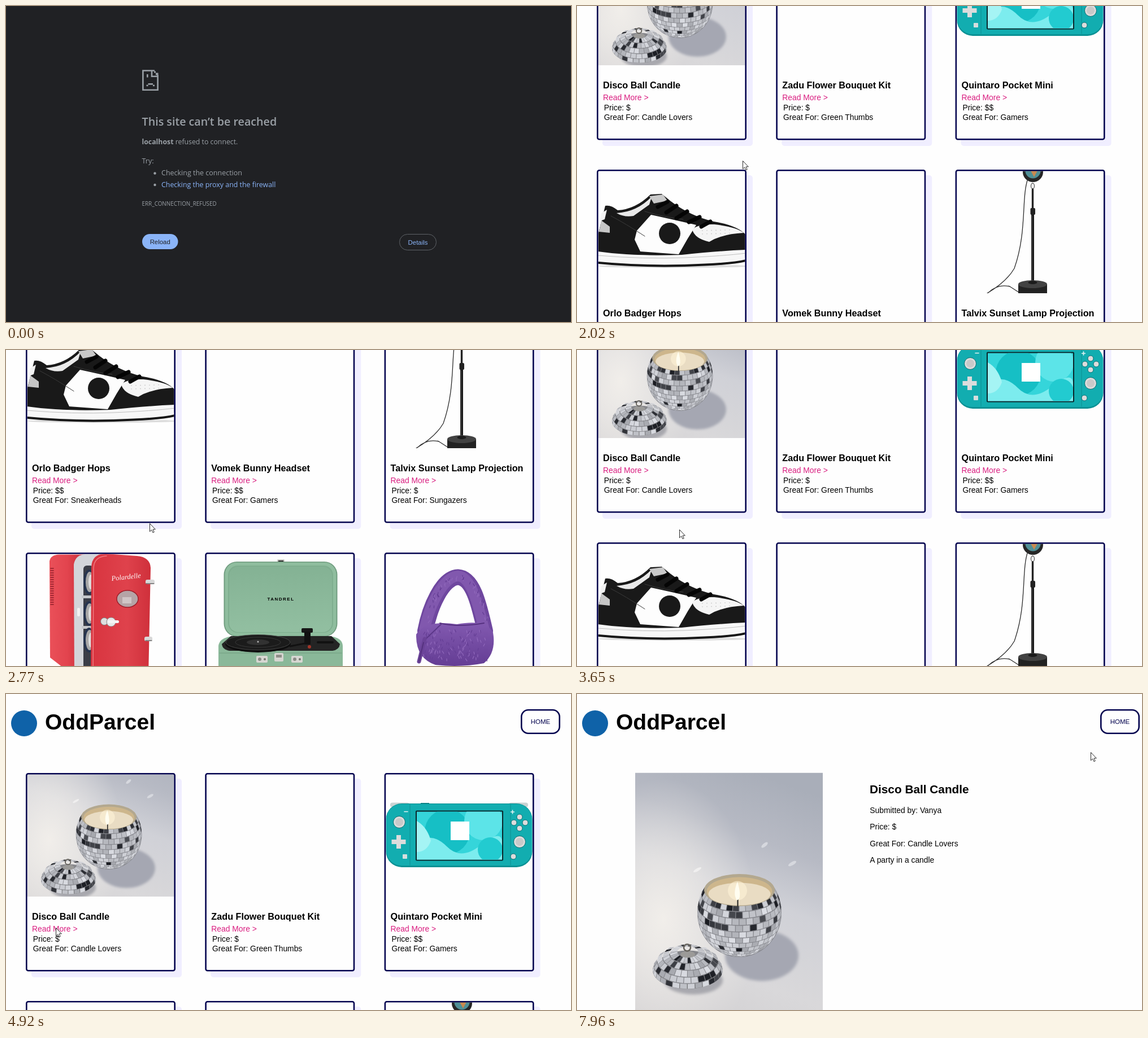
Animation, 1000 px wide and 560 px high, one loop 8000 ms. Source, as an HTML page:

```html
<!DOCTYPE html>
<html lang="en">
<head>
<meta charset="utf-8">
<title>Gift shop demo</title>
<style>
  html, body { margin: 0; width: 100%; height: 100%; overflow: hidden; background: #fefefe; }
  #stage { display: block; width: 100vw; height: 100vh; font: 13.87px "Liberation Sans", Arial, sans-serif; }
  #error { font-family: "Open Sans", "Noto Sans", sans-serif; font-size: 12.5px; fill: #9aa0a6; }
  #error .btn { font: 11.4px "Liberation Sans", Arial, sans-serif; }
  .name { font-size: 16.23px; font-weight: bold; }
  .more { fill: #d91c7f; }
  .edge { fill: none; stroke: #04044f; stroke-width: 2.6; }
</style>
</head>
<body>
<svg id="stage" viewBox="0 0 1000 560"></svg>
<script>
const LOOP = 8000;
const text = (x, y, s, attrs = '') => `<text x="${x}" y="${y}" ${attrs}>${s}</text>`;
const rect = (x, y, w, h, fill, rx = 0) =>
  `<rect x="${x}" y="${y}" width="${w}" height="${h}" rx="${rx}" fill="${fill}"/>`;
const oval = (x, y, rx, ry, fill, attrs = '') =>
  `<ellipse cx="${x}" cy="${y}" rx="${rx}" ry="${ry}" fill="${fill}" ${attrs}/>`;
const dot = (x, y, r, fill, attrs) => oval(x, y, r, r, fill, attrs);
const shape = (d, fill) => `<path d="${d}" fill="${fill}"/>`;
const line = (d, color, width = 1) =>
  `<path d="${d}" fill="none" stroke="${color}" stroke-width="${width}" stroke-linecap="round"/>`;
const fade = (id, dir, stops) => `<linearGradient id="${id}" ${dir}>` +
  stops.map(([at, c]) => `<stop offset="${at}" stop-color="${c}"/>`).join('') + '</linearGradient>';

let seed = 11;
const rand = () => (seed = seed * 16807 % 2147483647) / 2147483647;

// Mirror tiles on a tilted dome: latitude from..to, in radians.
function mirrors({ cx, cy, r, h, tilt, from, to, rows, cols, dark }) {
  const at = (lat, lon) => [
    cx + r * Math.cos(lat) * Math.sin(lon),
    cy - h * Math.sin(lat) * Math.cos(tilt) + r * Math.cos(lat) * Math.cos(lon) * Math.sin(tilt)
  ].map(v => v.toFixed(1)).join();
  let out = '';
  const dLat = (to - from) / rows, dLon = 2 * Math.PI / cols;
  for (let i = 0; i < rows; i++) for (let j = 0; j < cols; j++) {
    const a = from + i * dLat, lon = (j + i % 2 / 2) * dLon - Math.PI, mid = a + dLat / 2;
    const facing = Math.cos(mid) * Math.cos(lon + dLon / 2) * Math.cos(tilt) + Math.sin(mid) * Math.sin(tilt);
    if (facing < 0.03) continue;
    const black = rand() < dark(i / rows);
    const v = Math.round(black ? 25 + rand() * 50 : 165 + rand() * 55);
    const b = a + dLat * 0.88, end = lon + dLon * 0.9;
    out += `<polygon points="${at(a, lon)} ${at(a, end)} ${at(b, end)} ${at(b, lon)}" fill="rgb(${v},${v + 2},${v + 8})"/>`;
  }
  return out;
}

const photo = rect(0, 0, 332, 501, 'url(#wall)') + rect(0, 0, 332, 501, 'url(#glow)') +
  oval(229, 128, 7, 3, '#d6d8de', 'transform="rotate(-40 229 128)"') +
  oval(278, 161, 8, 3, '#d6d8de', 'transform="rotate(-30 278 161)"') +
  oval(110, 172, 8, 2.5, '#f0efef', 'transform="rotate(-30 110 172)"') +
  oval(224, 324, 65, 45, '#a5a7b2', 'filter="url(#soft)"') + oval(103, 368, 52, 25, '#a8a8ae', 'filter="url(#soft)"') +
  shape('M122.500 204A74.500 79 0 1 0 246.500 204Z', '#85868c') +
  mirrors({ cx: 184.5, cy: 247, r: 74.5, h: 80, tilt: 0.46, from: 0.59, to: -1.3, rows: 12, cols: 36,
    dark: p => p < 0.3 ? 0.42 : 0.04 }) +
  oval(184.5, 208, 62.5, 28.5, '#b3a88f') + oval(184.5, 210, 58, 25, '#cdb68c') +
  oval(184.5, 215, 55, 20, '#e9dcc3') + dot(181, 209, 17, '#fff3d8', 'opacity=".6"') +
  line('M181.500 224V236', '#222', 2) + shape('M181 193Q172 215 180 226Q190 224 181 193', '#fffdf0') +
  oval(93, 350, 62, 33, '#77777a') + oval(93, 345, 55, 30, '#85868b') +
  mirrors({ cx: 93, cy: 350, r: 62, h: 40, tilt: 0.56, from: 0, to: 1.3, rows: 5, cols: 28, dark: () => 0.26 }) +
  oval(93, 322, 13, 6, '#9b9a98') + `<circle cx="92" cy="310" r="6" fill="none" stroke="#66635d" stroke-width="2.500"/>`;

const knob = (x, y, r) => dot(x, y, r, '#dcdcdc', 'stroke="#0a6f72" stroke-width="1"');
const console3 = rect(680, 192.5, 34, 8, '#c9d3d3', 4) + rect(890, 192.5, 34, 8, '#c9d3d3', 4) +
  rect(672.5, 194, 259, 113, '#0b9194', 28) + rect(673, 195, 258, 109, '#12adb0', 27) +
  rect(734, 193, 15, 2, '#0b8285') +
  line('M715 196V303M893 196V303', '#0c8e92') +
  rect(725, 206.5, 155, 89, '#0a2328', 2) + rect(727, 208.5, 151, 85, '#35d5da') +
  `<svg x="727" y="208.500" width="151" height="85" viewBox="727 208.500 151 85">` +
  dot(781, 244, 40, '#16bfc5') + dot(845, 225, 34, '#5ce4e8') +
  shape('M727 262Q755 244 780 270T840 268T878 260V294H727Z', '#7cecee') +
  shape('M727 225Q745 235 752 260Q745 280 727 280Z', '#a5f4f4') + dot(857, 276, 22, '#22cbd0') + '</svg>' +
  rect(787, 226, 33, 33, '#fff') +
  knob(696, 227, 10.5) + dot(696, 227, 7, '#c9c9c9') + knob(909, 262, 10.5) + dot(909, 262, 7, '#c9c9c9') +
  shape('M691 250h8v8h8.500v8h-8.500v8h-8v-8h-8.500v-8h8.500z', '#dcdcdc') +
  [[909, 218], [899, 228], [919, 228], [909, 238]].map(([x, y]) => knob(x, y, 5)).join('') +
  rect(702, 284, 8, 8, '#d4dede', 1) + knob(898, 288, 5) +
  line('M705 208.500H711M893.500 209H899.500M896.500 206V212', '#e6f4f4', 1.6);

const shoe = oval(170, 461, 134, 3, '#ddd') +
  shape('M38 402L50 354Q60 352 72 362Q104 360 130 334L150 333L166 346Q200 372 242 382Q285 389 299 406V445L38 440Z', '#191919') +
  shape('M70 367Q106 365 132 338L128 352L100 372Q84 375 70 367', '#e9e9e9') +
  shape('M128 337L152 334L160 345L136 350Z', '#c9c9c9') +
  shape('M43 380L58 391V402L39 400Z', '#c6c6c6') + shape('M43 367L53 361L49 378L41 381Z', '#f2f2f2') +
  shape('M106 398L131 370Q168 378 211 388L196 412L180 440L112 435L102 414Z', '#fdfdfd') +
  shape('M204 396Q214 386 243 387Q281 391 295 402Q257 404 234 418Q208 412 204 396', '#f5f5f5') +
  dot(164, 403, 19, '#191919') +
  line('M60 372Q85 385 120 408M120 364Q160 376 188 378', '#3a3a3a') +
  line('M143 356L160 347M158 366L176 354M176 376L195 364M198 383L217 374M220 391L236 382', '#050505', 7) +
  Array.from({ length: 14 }, (_, i) => dot(222 + i % 7 * 8, 398 + (i > 6) * 6 - i % 7 * .2, .8, '#bbb')).join('') +
  shape('M37 435Q100 444 185 441Q250 434 299 432V449Q210 462 150 460L40 455Z', '#f7f7f7') +
  line('M37 442Q120 449 190 446T299 438', '#bdbdbd') + line('M38 455Q110 462 190 460T299 451', '#161616', 4);

const lamp = dot(807, 294, 18, '#262626') + dot(807, 292, 13.5, '#4f8f96') + shape('M803 292L815 292L809 303Z', '#c98a50') +
  line('M798 306C786 340 797 400 774 465Q760 489 726 509M728 508Q744 492 766 497L783 508', '#2b2b2b', 1.3) +
  oval(806.5, 319, 3, 5, 'none', 'stroke="#555" stroke-width="1.300"') + line('M806.500 325V362', '#222', 3.4) +
  line('M806.500 368V488', '#1d1d1d', 5) + rect(802.5, 358, 8.5, 12, '#222', 2) + line('M805.500 372V486', '#555', .8) +
  rect(781, 493, 51, 18, '#222') + oval(806.5, 493, 25.5, 7, '#424242') + oval(806.5, 490, 8, 3, '#1b1b1b');

const can = y => oval(147, y, 10, 22, '#26344f') + oval(148, y, 7, 18, '#a8a8a8') + oval(150, y, 4, 13, '#ddd');
const fridge = shape('M77 374Q79 363 94 362.500H140L122 579L78 545Z', 'url(#side)') +
  Array.from({ length: 17 }, (_, i) => line(`M79 ${387 + i * 4}H84`, '#8e1d28', 1.6)).join('') +
  shape('M120 380Q123 362 142 362H170V579H121Z', '#d3d5da') + rect(137, 382, 18, 197, '#3a3d47', 6) +
  can(411) + rect(134, 435, 20, 5, '#c5c7cb') + can(467) + rect(134, 489, 20, 5, '#c5c7cb') + can(514) +
  rect(126, 457, 5, 15, '#f2f2f2', 2) +
  shape('M151 385Q152 361 176 361L232 365Q255 367 256 386L252 579H150Z', 'url(#door)') +
  line('M154 579L155 386Q156 366 178 365', '#f07a80', 1.5) +
  oval(215, 441, 19, 15, '#b5a4a6', 'stroke="#9d1f2b" stroke-width="1.500"') + rect(206, 438, 16, 11, '#d0c5c6') +
  text(187, 409, 'Polardelle', 'font-family="Liberation Serif, serif" font-style="italic" font-size="12.500" fill="#fff" transform="rotate(-6 187 409)"') +
  rect(247, 407, 16, 8, '#d8d8d8', 3) + rect(245, 508, 14, 8, '#d8d8d8', 3) + line('M248 414H262M247 515H258', '#333', 1.2) +
  dot(174, 481, 6.5, '#dedede', 'stroke="#777"') + dot(186, 482, 8, '#e8e8e8', 'stroke="#8a8a8a"') + rect(180, 479, 20, 5, '#f4f4f4', 2.5);

const latch = x => rect(x - 10, 542, 20, 12, '#d7d7d2', 2) + dot(x - 4, 548, 3, '#8b8b86') + dot(x + 5, 548, 2, '#77776f');
const player = rect(480, 371, 13, 10, '#c5c5c0', 2) + rect(482, 373, 9, 3, '#333') +
  rect(385.5, 375, 201, 133, '#719d80', 23) + rect(387.5, 376.5, 197, 130, '#8fbd9e', 21) +
  rect(393, 382, 186, 119, '#7fae8f', 17) + rect(395, 384, 182, 116, 'url(#felt)', 16) +
  text(486.5, 443.5, 'TANDREL', 'text-anchor="middle" font-size="8" font-weight="bold" letter-spacing="1.500"') +
  shape('M376 524Q378 511 396 508H578Q595 511 596 524V579H376Z', '#8ab899') +
  shape('M382 521L398 507H576L591 521Q590 531 578 533H396Q383 531 382 521', '#242424') +
  oval(446, 521, 58, 15, '#0e0e0e') + oval(446, 518, 57, 13.5, '#1b1b1b', 'stroke="#555" stroke-width=".700"') +
  oval(446, 518, 40, 9, 'none', 'stroke="#383838"') + oval(446, 518, 20, 5, '#323232') + dot(446, 517, 1.5, '#bbb') +
  rect(523, 493, 20, 8, '#161616', 2) + rect(528, 499, 11, 23, '#111', 2) + line('M534 519L503 525', '#111', 3) + dot(537, 526, 3, '#a33528') +
  rect(550, 516, 30, 4, '#111', 2) +
  line('M378 537H594', '#719d80') + latch(453) + latch(515) + rect(475, 537, 16, 15, '#d5d5d0', 2) + rect(478, 540, 10, 5, '#8e8e88');

const tuft = (x, y) => line(`M${x.toFixed(1)} ${y.toFixed(1)}l${(rand() * 6 - 3).toFixed(1)} 4`, rand() < .5 ? '#9068bb' : '#643d94', 1.2);
const bag = line('M742 498C750 456 772 404 800 402.500C828 404 838 456 848 498', '#6f479f', 28) +
  line('M741 494C750 452 774 402 800 400.500C824 402 836 452 846 494', '#8158ae', 19) +
  shape('M726 504Q742 478 798 486Q850 476 862 501Q868 536 846 555Q805 563 760 558Q725 546 726 504', 'url(#fur)') +
  line('M768 484Q800 492 846 484', '#563180', 2) +
  Array.from({ length: 110 }, () => tuft(738 + rand() * 114, 494 + rand() * 54)).join('') +
  Array.from({ length: 60 }, () => {
    const a = Math.PI * (0.05 + rand() * 0.9);
    return tuft(796 - Math.cos(a) * 50 + rand() * 8, 486 - Math.sin(a) * 88 + rand() * 8);
  }).join('') +
  line('M770 486L741 514', '#5b3788', 2) + line('M741 512L731 552', '#6a4297', 7) + line('M739 518L731 552', '#4b2a74', 1.2);

// [name, price, audience, picture, vertical shift of its drawing]
const items = [
  ['Disco Ball Candle', '$', 'Candle Lovers', '', 0],
  ['Zadu Flower Bouquet Kit', '$', 'Green Thumbs', '', 0],
  ['Quintaro Pocket Mini', '$$', 'Gamers', console3, 0],
  ['Orlo Badger Hops', '$$', 'Sneakerheads', shoe, 254],
  ['Vomek Bunny Headset', '$$', 'Gamers', '', 254],
  ['Talvix Sunset Lamp Projection', '$', 'Sungazers', lamp, 254],
  ['', '', '', fridge, 589], ['', '', '', player, 589], ['', '', '', bag, 589]
];
const card = ([name, price, fans, art, shift], i) => {
  const x = 35 + i % 3 * 317.3, y = 140 + Math.floor(i / 3) * 404;
  const box = `x="${x + 2.6}" y="${y + 2.6}" width="260" height="216.500"`;
  return rect(x + 10, y + 10, 266, 352, '#f0eeff', 5) + rect(x, y, 265, 351, '#fefefe', 4) +
    (i ? `<svg ${box} viewBox="${x + 2.6} ${y + 2.6 - shift} 260 216.500">${art}</svg>`
       : `<svg ${box} viewBox="0 112 332 276.500"><use href="#photo"/></svg>`) +
    `<rect class="edge" x="${x + 1.3}" y="${y + 1.3}" width="262.400" height="349" rx="3"/>` +
    (name && text(x + 11, y + 259.5, name, 'class="name"') +
      text(x + 11, y + 281, 'Read More &gt;', 'class="more"') +
      text(x + 12.8, y + 298.5, 'Price: ' + price) + text(x + 12.8, y + 316, 'Great For: ' + fans));
};

const errorPage = rect(0, 0, 1000, 560, '#202124') +
  line('M262 114.500H242.400V148.700H268.600V123', '#9aa0a6', 2.6) + line('M258 115V124.700H268', '#9aa0a6', 2.6) +
  rect(262, 115.5, 3, 3, '#9aa0a6') + rect(265, 118.5, 4.5, 4, '#9aa0a6') + rect(249, 121, 2.6, 5.5, '#9aa0a6') +
  rect(251.5, 137, 8.5, 2.6, '#9aa0a6') + rect(248.5, 139.6, 3, 2.6, '#9aa0a6') + rect(260, 139.6, 3, 2.6, '#9aa0a6') +
  text(240.5, 211.5, 'This site can’t be reached', 'font-size="19.700" font-weight="600"') +
  text(240.5, 245, '<tspan font-weight="bold">localhost</tspan> refused to connect.', 'font-size="12.300"') +
  text(240.5, 279, 'Try:') + dot(263.5, 296.5, 2.2, '#9aa0a6') + dot(263.5, 317, 2.2, '#9aa0a6') +
  text(275, 300, 'Checking the connection') +
  text(275, 320.7, 'Checking the proxy and the firewall', 'fill="#8ab4f8" font-size="12.400"') +
  text(240.5, 353.5, 'ERR_CONNECTION_REFUSED', 'font-size="9.900"') +
  rect(241, 404, 63.5, 27, '#8ab4f8', 13.5) + text(272.7, 421.5, 'Reload', 'class="btn" text-anchor="middle" fill="#202124"') +
  '<rect x="696.500" y="404.500" width="65" height="28" rx="14" fill="none" stroke="#5f6368"/>' +
  text(729, 422.5, 'Details', 'class="btn" text-anchor="middle" fill="#8ab4f8"');

const stage = document.getElementById('stage');
stage.innerHTML = '<defs>' +
  fade('wall', 'x1=".650" y1="0" x2=".400" y2="1"', [[0, '#a9aeb9'], [.22, '#b7bac4'], [.42, '#d0d1d7'], [.7, '#d9d8da'], [1, '#cfcdcf']]) +
  '<radialGradient id="glow" cx=".150" cy=".520" r=".500"><stop offset="0" stop-color="#f1eeea"/><stop offset="1" stop-color="#f1eeea" stop-opacity="0"/></radialGradient>' +
  '<filter id="soft"><feGaussianBlur stdDeviation="2.500"/></filter>' +
  fade('side', '', [[0, '#ea5059'], [.5, '#e2444e'], [1, '#c62c39']]) +
  fade('door', '', [[0, '#d8343f'], [.6, '#df424c'], [1, '#cf303b']]) +
  fade('felt', 'x2="0" y2="1"', [[0, '#84b294'], [1, '#92bfa1']]) +
  fade('fur', 'x2="0" y2="1"', [[0, '#8259b0'], [1, '#643d94']]) +
  `<g id="photo">${photo}</g></defs>` + rect(0, 0, 1000, 560, '#fefefe') +
  `<g id="page"><g id="top">${dot(32, 52, 23, '#0f62a8')}
    ${text(69, 62.5, 'OddParcel', 'font-size="39" font-weight="bold"')}
    <g id="home"><rect class="edge" x="912.300" y="28.300" width="67.400" height="41.400" rx="12"/>
    ${text(946, 53, 'HOME', 'text-anchor="middle" font-size="11.560" fill="#04044f"')}</g></g>
    <g id="cards">${items.map(card).join('')}</g></g>
  <g id="detail"><svg x="103" y="139.500" width="332" height="501" viewBox="0 0 332 501"><use href="#photo"/></svg>
    ${text(518, 176, 'Disco Ball Candle', 'font-size="20.800" font-weight="bold"')}
    ${['Submitted by: Vanya', 'Price: $', 'Great For: Candle Lovers', 'A party in a candle']
      .map((s, i) => text(518.3, 210.8 + i * 29.5, s)).join('')}</g>
  <g id="error">${errorPage}</g>
  <path id="arrow" d="M.500.500V14.800L3.700 11.800L6 16.700L8.200 15.700L6 10.900H10.300Z" fill="#fff" stroke="#111" stroke-width=".900"/>`;

// Motion runs in bursts: [start, end, number of steps].
const bursts = [[930, 1470, 8], [1670, 2430, 12], [2560, 2970, 7], [3250, 4050, 12], [4110, 4600, 8],
  [4800, 5060, 4], [5250, 5460, 4], [5790, 6330, 8], [7130, 7280, 3], [7550, 7960, 7]];
const pointer = [[930, 425, -9], [1470, 344, 110], [1670, 354, 180], [1739, 357, 195], [2015, 293, 274],
  [2430, 276, 291], [2765, 254, 307], [2970, 238, 313], [3180, 236, 314], [3613, 181, 318], [4050, 173, 312],
  [4600, 82, 427], [4800, 88, 414], [5180, 88, 414], [5460, 509, 286], [5710, 509, 285], [6330, 467, 363],
  [7060, 467, 363], [7280, 478, 345], [7480, 478, 345], [7960, 909, 103]];
const scroll = [[1739, 0], [1877, 105], [2015, 254], [2200, 385], [2430, 480], [2490, 480], [2765, 589],
  [2970, 630], [3180, 630], [3613, 203], [3800, 70], [4050, 0]];

function snap(t) {
  const burst = bursts.filter(b => b[0] <= t).pop();
  if (!burst) return 0;
  const [from, to, n] = burst, gap = (to - from) / (n - 1);
  return Math.min(to, from + Math.floor((t - from) / gap + 1e-6) * gap);
}
function along(keys, t) {
  const i = keys.findIndex(k => k[0] > t);
  if (i < 0) return keys[keys.length - 1].slice(1);
  if (i === 0) return keys[0].slice(1);
  const a = keys[i - 1], b = keys[i], p = (t - a[0]) / (b[0] - a[0]);
  return a.slice(1).map((v, j) => v + (b[j + 1] - v) * p);
}

const el = id => document.getElementById(id);
const show = (id, on) => el(id).setAttribute('display', on ? 'inline' : 'none');
const move = (id, x, y) => el(id).setAttribute('transform', `translate(${Math.round(x)} ${Math.round(y)})`);

function draw(t) {
  const s = snap(t), listed = t >= 200 && t < 5000;
  show('error', t < 70);
  show('cards', listed);
  show('detail', t >= 5000);
  show('arrow', t >= 930);
  move('home', listed ? 0 : 15, 0);
  move('page', 0, -along(scroll, s)[0]);
  move('arrow', ...along(pointer, s));
}

const start = performance.now();
function tick() {
  draw((performance.now() - start) % LOOP);
  requestAnimationFrame(tick);
}
tick();
</script>
</body>
</html>
```
